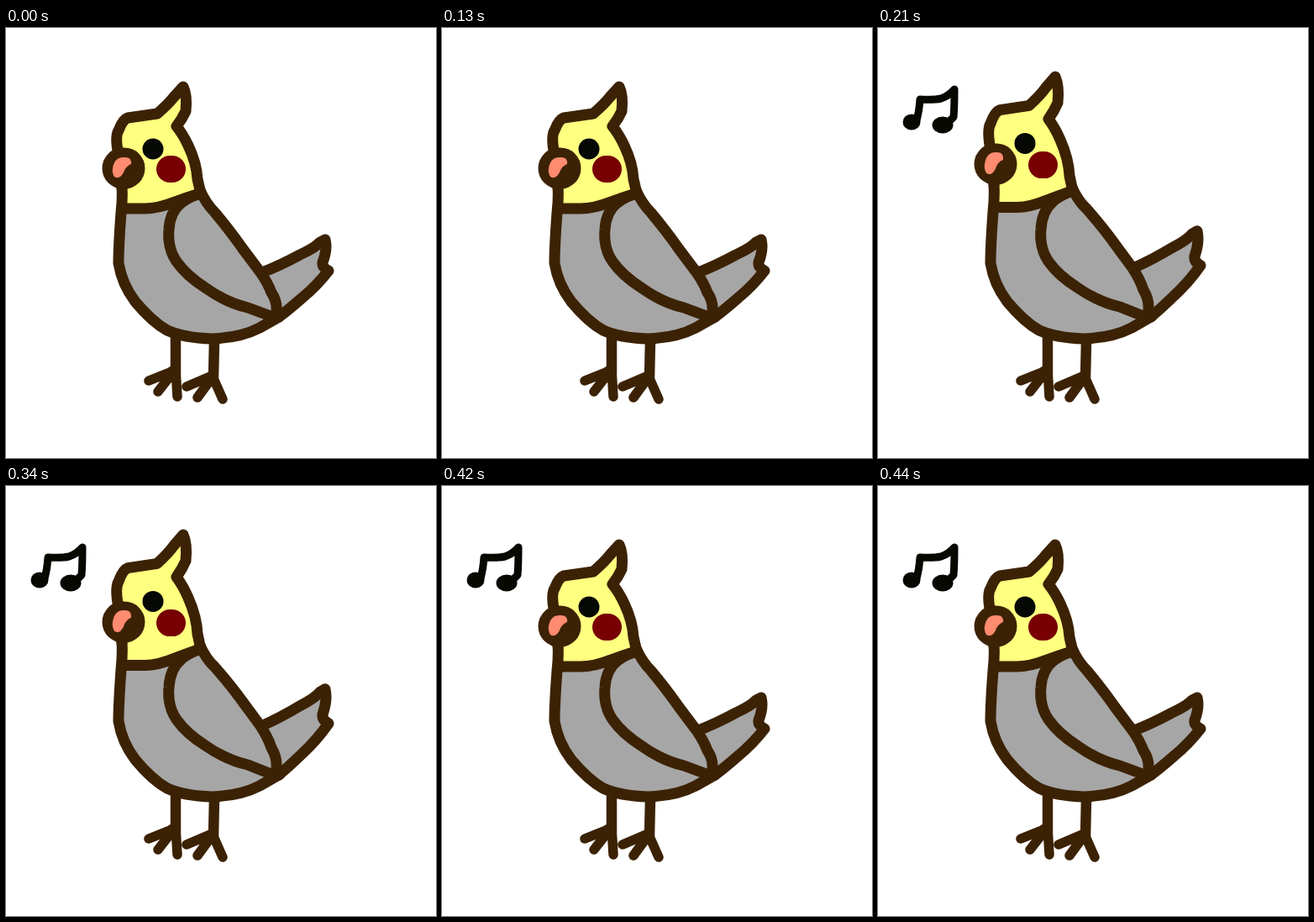
Animation, 512 px wide and 512 px high, one loop 460 ms. Source, as an HTML page:

```html
<!DOCTYPE html>
<html>
<head>
<meta charset="utf-8">
<style>
  html, body { margin: 0; height: 100%; overflow: hidden; background: #fff; }
  svg { display: block; width: 100vw; height: 100vh; }
  path { fill: none; stroke-linecap: round; stroke-linejoin: round; }
</style>
</head>
<body>
<svg viewBox="0 0 512 512">
  <g id="bird"></g>
  <g id="note" fill="#070800">
    <ellipse cx="40" cy="112" rx="10.500" ry="9.500"/>
    <ellipse cx="77" cy="115.500" rx="12.500" ry="10"/>
    <path d="M46 110Q49 99 50 85Q66 86 75 84Q84 81 91 73Q91 94 90 106L83 113" stroke="#070800" stroke-width="9"/>
  </g>
</svg>
<script>
const LOOP = 460, SING = 210, REST = 420;
const BROWN = '#3c2204', GREY = '#a6a6a6';

const head = 'M138,190 L133,146 Q130,128 134,122 Q139,109 145,107 L180,102 Q193,91 200,82 ' +
  'L211,70 Q216,80 214,99 Q210,108 203,117 Q211,127 217,140 Q227,161 228,180 L231,193';
const neck = 'L231,197 Q215,202 201,207 Q181,215 165,215 L140,215';
const body = 'M138,190 Q139,202 137,220 Q134,260 134,280 Q138,305 154,326 Q174,350 192,360 ' +
  'Q212,369 245,370 Q279,369 302,357 L325,344';
const back = 'M231,193 Q238,209 249,220 Q268,243 282,263 L303,291 Q312,304 316,315 Q323,325 322,337';
const tail = 'M305,291 Q326,283 350,270 Q369,261 374,255 L380,252 Q383,264 377,279 ' +
  'Q376,285 384,289 Q370,307 353,321 Q337,335 325,344';
const wing = 'M231,197 Q216,202 209,208 Q195,219 194,240 Q192,262 203,278 Q215,295 237,309 ' +
  'Q262,327 288,333 L315,343';

// [path, fill, stroke, width]
const parts = [
  [body + ' L303,291 L231,198 L140,216 Z', GREY],
  [tail + ' Z', GREY],
  [head + neck + ' Z', '#ffff80'],
  ...[head, body, back, tail, wing, 'M231,197' + neck].map(d => [d, 'none', BROWN, 13]),
  ['M202,369 L202,411 M248,372 L247,417', 'none', BROWN, 12.5],
  ['M170,420 L195,410 L202,406 L181,433 M202,406 L204,439 ' +
   'M215,427 L243,415 L247,414 L228,440 M246,415 L258,442', 'none', BROWN, 11.5],
  ['M175,144 L175,144', 'none', '#060805', 25],
  ['M195,168 L198,168', 'none', '#780003', 32],
  ['M139,167 L141,167', 'none', BROWN, 49],
  ['M127,167 Q129,154 140,154 Q150,153 149,162 Q142,165 140,172 Q135,181 129,177 Q126,172 127,167 Z', '#ff8b70']
];

// Raises the head and tail while the feet and belly stay put.
function stretch(x, y) {
  const side = Math.min(1, Math.max(0, (x - 230) / 80));
  const lift = Math.max(0, 235 - y) * 0.073 * (1 - side) + side * Math.max(0, 345 - y) * 0.11;
  return y - lift;
}

const pose = up => parts.map(([d, fill, stroke = 'none', width = 0]) => {
  const path = up ? d.replace(/(\d+),(\d+)/g, (_, x, y) => `${x},${stretch(+x, +y).toFixed(1)}`) : d;
  return `<path d="${path}" style="fill:${fill}" stroke="${stroke}" stroke-width="${width}"/>`;
}).join('');

const poses = [pose(false), pose(true)];
const bird = document.getElementById('bird');
const note = document.getElementById('note');
const start = performance.now();
let shown = -1;

function draw(now) {
  const t = Math.max(0, now - start) % LOOP;
  const up = +(t >= SING && t < REST);
  if (up !== shown) bird.innerHTML = poses[shown = up];
  note.style.display = t >= SING ? '' : 'none';
  requestAnimationFrame(draw);
}
draw(start);
</script>
</body>
</html>
```
